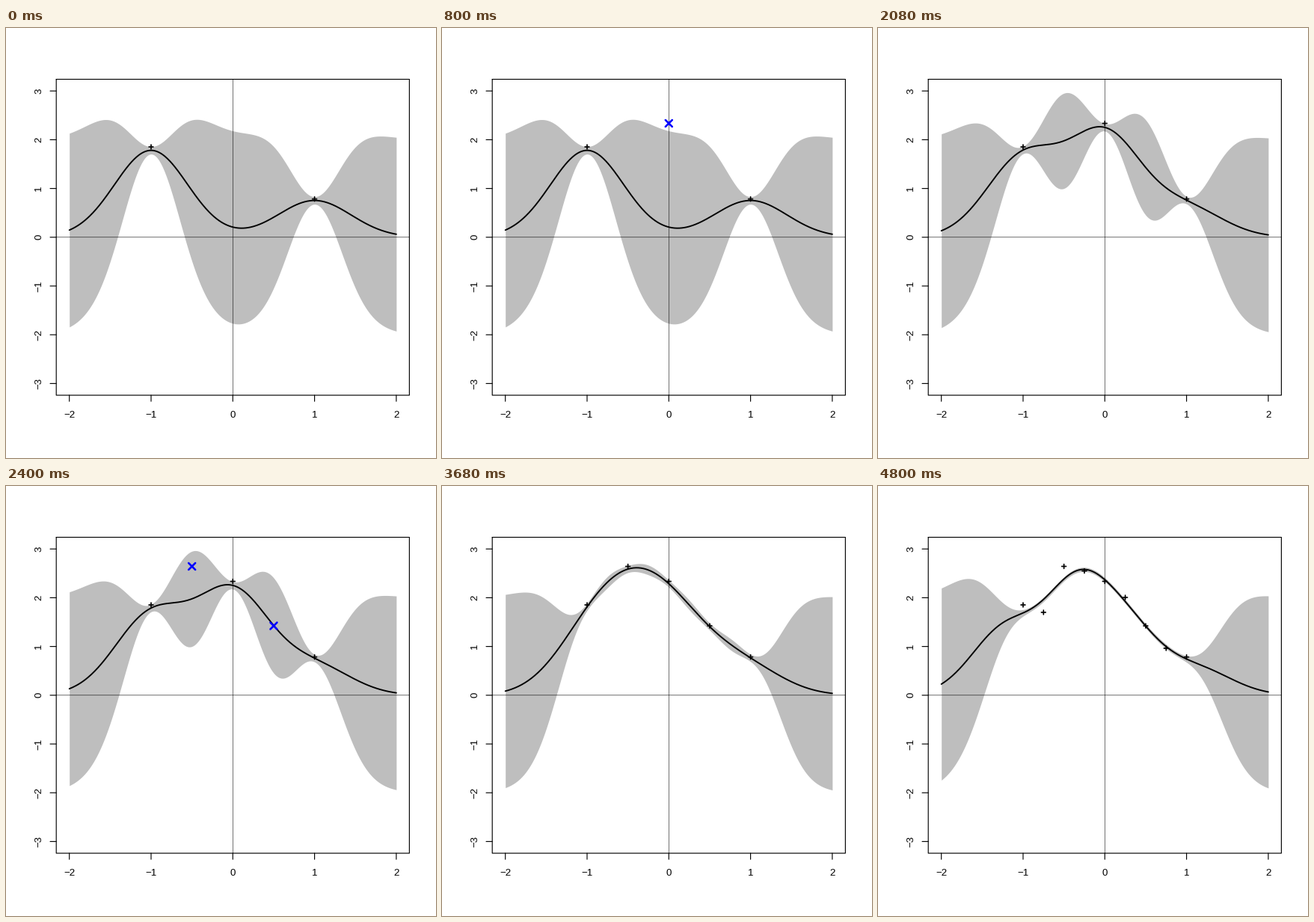
These frames come from a looping animation (575 px wide and 575 px high, 5600 ms). A matplotlib script:

```python
"""Gaussian process regression refined by successively halving the sample spacing."""
import numpy as np
import matplotlib.pyplot as plt
from matplotlib.animation import FuncAnimation

SIZE, DPI = 575, 100
PT = 72 / DPI                      # points per pixel
X0, SX = 303.3, 109.3              # data -> pixel mapping
Y0, SY = 279.8, 65.2
NOISE = 0.04

# Observations, grouped by the round in which they are sampled
ROUNDS = [
    [(-1, 1.853), (1, 0.784)],
    [(0, 2.336)],
    [(-0.5, 2.643), (0.5, 1.423)],
    [(-0.75, 1.700), (-0.25, 2.549), (0.25, 2.006), (0.75, 0.963)],
]
GRID = np.linspace(-2, 2, 401)


def px(x):
    return X0 + SX * np.asarray(x)


def py(y):
    return Y0 - SY * np.asarray(y)


def kernel(a, b):
    return np.exp(-2.5 * (a[:, None] - b[None, :]) ** 2)


def posterior(points):
    """Mean and variance of the process on the grid."""
    x, y = np.array(points, float).T
    gram = kernel(x, x) + NOISE * np.eye(len(x))
    cross = kernel(GRID, x)
    mean = cross @ np.linalg.solve(gram, y)
    var = 1 - np.sum(cross * np.linalg.solve(gram, cross.T).T, axis=1)
    return mean, var


fig = plt.figure(figsize=(SIZE / DPI, SIZE / DPI), dpi=DPI, facecolor="white")
ax = fig.add_axes([0, 0, 1, 1])


def stroke(xs, ys, width, color="black", z=3):
    ax.plot(xs, ys, color=color, lw=width * PT, zorder=z, snap=False,
            solid_capstyle="round", solid_joinstyle="round")


def plus(x, y, r=2.9):
    cx, cy = px(x), py(y)
    stroke([cx - r, cx + r], [cy, cy], 1.7)
    stroke([cx, cx], [cy - r, cy + r], 1.7)


def cross(x, y, r=4.5):
    cx, cy = px(x), py(y)
    stroke([cx - r, cx + r], [cy - r, cy + r], 2.6, "#0000ff", 4)
    stroke([cx - r, cx + r], [cy + r, cy - r], 2.6, "#0000ff", 4)


def draw_axes():
    left, right = px(-2.16), px(2.16)
    top, bottom = py(3.24), py(-3.24)
    stroke([left, right, right, left, left],
           [top, top, bottom, bottom, top], 1.15)
    stroke([X0, X0], [top, bottom], 0.55)
    stroke([left, right], [Y0, Y0], 0.55)

    style = dict(family="Liberation Sans", size=13.4 * PT, ha="center",
                 va="baseline", rotation_mode="anchor")
    for v in range(-3, 4):
        label = str(v).replace("-", "\u2212")
        stroke([left, left - 8.2], [py(v)] * 2, 1.15)
        ax.text(47, py(v), label, rotation=90, **style)
        if abs(v) <= 2:
            stroke([px(v)] * 2, [bottom, bottom + 8.2], 1.15)
            ax.text(px(v), 521, label, **style)


def draw(frame):
    # Even frames show the fit, odd ones add the next samples to it
    ax.clear()
    ax.set(xlim=(0, SIZE), ylim=(SIZE, 0))
    ax.axis("off")
    known = frame // 2 + 1
    points = sum(ROUNDS[:known], [])
    mean, var = posterior(points)
    ax.fill_between(px(GRID), py(mean + 2 * var), py(mean - 2 * var),
                    color="#bebebe", lw=0, zorder=1)
    stroke(px(GRID), py(mean), 1.9)
    draw_axes()
    for p in points:
        plus(*p)
    if frame % 2:
        for p in ROUNDS[known]:
            cross(*p)
    return []


anim = FuncAnimation(fig, draw, frames=7, init_func=lambda: [], interval=800,
                     repeat=True, repeat_delay=0, blit=False)
plt.show()
```
